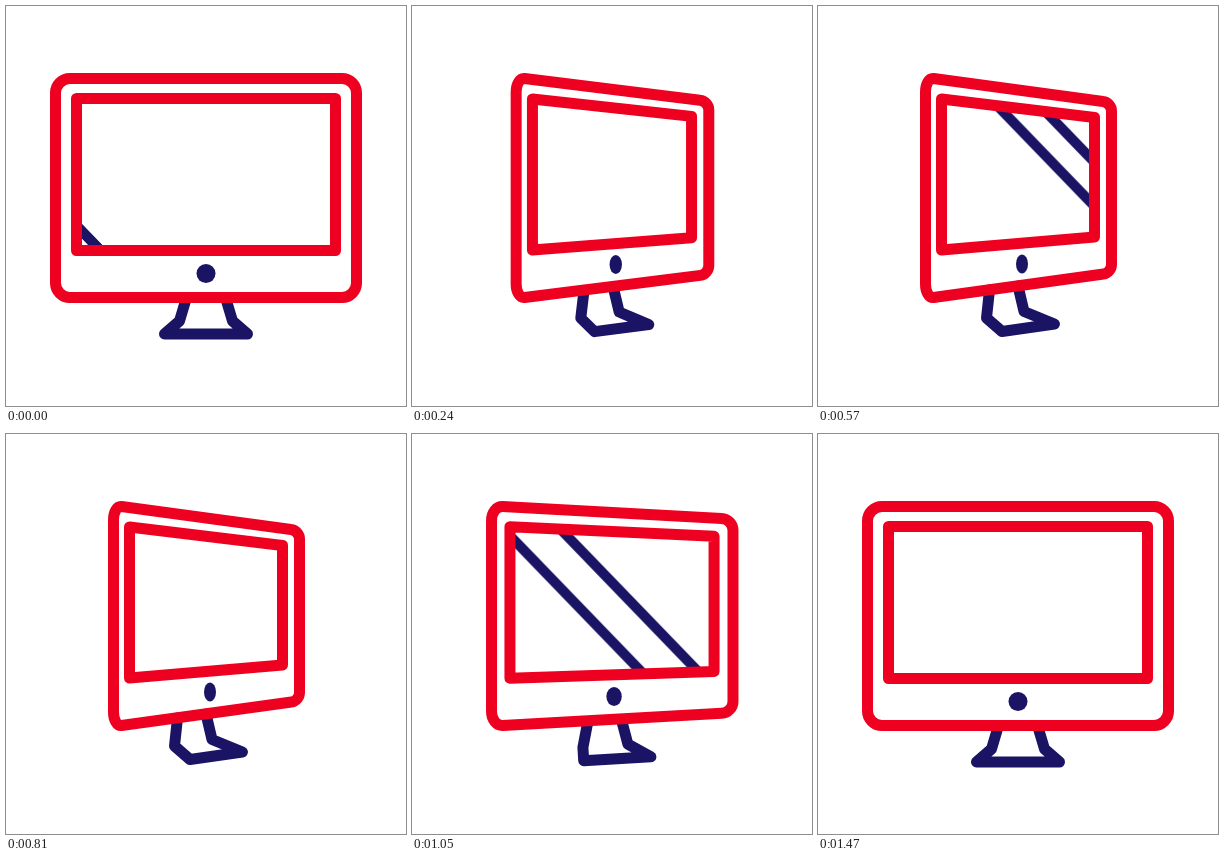
An HTML page for the animation above (3.62 s loop, 400 by 400 pixels).

```html
<!DOCTYPE html>
<html lang="en">
<head>
<meta charset="utf-8">
<title>Turning monitor</title>
<style>
  html, body { margin: 0; width: 100%; height: 100%; overflow: hidden; background: #fff; }
  svg { display: block; width: 100%; height: 100%; }

  path { fill: none; stroke-width: 11; stroke-linecap: round; stroke-linejoin: round; }
  .red { stroke: #ee0020; }
  .navy { stroke: #1b1464; }

  .case {
    --front: path("M64 72.5 L336 72.5 C344 72.5 350.5 79 350.5 87 L350.5 277 C350.5 285 344 291.5 336 291.5 L64 291.5 C56 291.5 49.5 285 49.5 277 L49.5 87 C49.5 79 56 72.5 64 72.5 Z");
    --side: path("M115.5 72.5 L285 95.5 C289.7 96 293.5 100.5 293.5 105 L293.5 258.5 C293.5 263 290 267.5 285.5 268 L115.5 291.5 C111 292 107.5 286 107.5 278 L107.5 86 C107.5 78 111 72 115.5 72.5 Z");
  }
  .screen {
    --front: path("M70.5 92.5 L329.5 92.5 L329.5 244.5 L70.5 244.5 Z");
    --side: path("M123.5 93 L276.5 111.5 L276.5 231 L123.5 244 Z");
  }
  .stand {
    --front: path("M180.5 291.5 L173.5 315 L158.5 328 L241.5 328 L226.5 315 L219.5 291.5");
    --side: path("M171.5 284 L168.5 312 L184 325.5 L236.5 318 L206 305.5 L200 280");
  }
  .turn { d: var(--front); animation: turn 3620ms ease-in-out infinite; }
  .dot { fill: #1b1464; animation: dot 3620ms ease-in-out infinite; }

  .shine { stroke-width: 10; transform: translateX(-47px); animation: sweep 3620ms linear infinite; }
  .late { animation-delay: 82ms; }

  @keyframes turn {
    0%, 33.122%, 100% { d: var(--front); }
    8.011%, 25.11% { d: var(--side); }
  }
  @keyframes dot {
    0%, 33.122%, 100% { cx: 200px; cy: 267.5px; rx: 9.5px; ry: 9.5px; }
    8.011%, 25.11% { cx: 204px; cy: 258px; rx: 6px; ry: 9.5px; }
  }
  /* two sweeps: one while turned away, one while coming back */
  @keyframes sweep {
    0% { transform: translateX(-47px); }
    5.801% { transform: translateX(-47px); animation-timing-function: cubic-bezier(.333, .565, .667, .899); }
    20.442% { transform: translateX(274px); animation-timing-function: step-start; }
    20.47%, 21.823% { transform: translateX(-30px); }
    33.978% { transform: translateX(275.5px); animation-timing-function: cubic-bezier(.333, .667, .667, 1); }
    39.282%, 100% { transform: translateX(342px); }
  }
</style>
</head>
<body>
<svg viewBox="0 0 400 400">
  <clipPath id="glass"><path class="screen turn"/></clipPath>
  <path class="stand turn navy"/>
  <g clip-path="url(#glass)">
    <path class="shine navy" d="M-38.6 58 L173.9 278"/>
    <path class="shine late navy" d="M-38.6 58 L173.9 278"/>
  </g>
  <path class="case turn red"/>
  <path class="screen turn red"/>
  <ellipse class="dot" cx="200" cy="267.5" rx="9.5" ry="9.5"/>
</svg>
</body>
</html>
```
